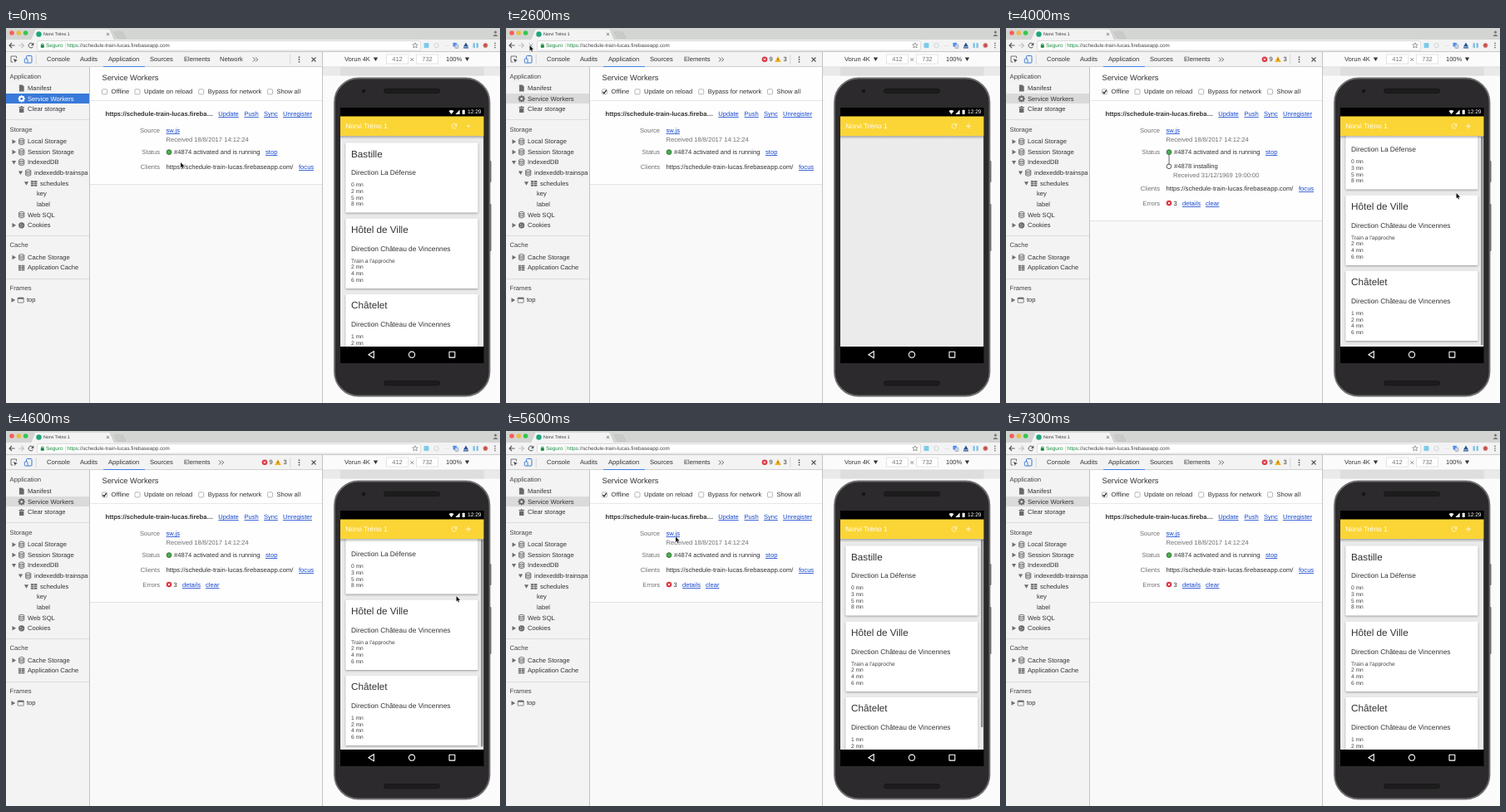
An HTML page with a canvas for the animation above (7.4 s loop, 594x452 px).

```html
<!DOCTYPE html>
<html lang="en">
<head>
<meta charset="utf-8">
<title>Service worker offline demo</title>
<style>
html, body { margin: 0; width: 100%; height: 100%; overflow: hidden; background: #fff; }
canvas { display: block; }
</style>
</head>
<body>
<canvas id="stage" width="594" height="452"></canvas>
<script>
const LOOP = 7400, STEP = 100;
const HOST = 'https://schedule-train-lucas.fireba';
const INK = '#333', GREY = '#707070', ICON = '#6a6a6a', BLUE = '#1547d0', RED = '#d9333f';
const c = document.getElementById('stage').getContext('2d');
c.textRendering = 'geometricPrecision';
c.textBaseline = 'middle';

// Drawing helpers
function rect(x, y, w, h, fill) {
  c.fillStyle = fill;
  c.fillRect(x, y, w, h);
}
function box(x, y, w, h, r, fill, stroke, width = 1) {
  c.beginPath();
  c.roundRect(x, y, w, h, r);
  paint(fill, stroke, width);
}
function dot(x, y, r, fill, stroke, width = 1) {
  c.beginPath();
  c.arc(x, y, r, 0, 7);
  paint(fill, stroke, width);
}
function path(d, x, y, fill, stroke, width = 1) {
  c.save();
  c.translate(x, y);
  const p = new Path2D(d);
  c.lineWidth = width;
  if (stroke) { c.strokeStyle = stroke; c.stroke(p); }
  if (fill) { c.fillStyle = fill; c.fill(p); }
  c.restore();
}
function paint(fill, stroke, width) {
  if (fill) { c.fillStyle = fill; c.fill(); }
  if (stroke) { c.strokeStyle = stroke; c.lineWidth = width; c.stroke(); }
}
function text(s, x, y, size = 7.6, fill = INK, align = 'left', weight = '') {
  c.font = `${weight} ${size}px "Liberation Sans", Arial, sans-serif`;
  c.textAlign = align;
  c.fillStyle = fill;
  c.fillText(s, x, y + .3);
}
function link(s, x, y) {
  text(s, x, y, 7.6, BLUE);
  rect(x, Math.round(y + 3.4), c.measureText(s).width, .8, BLUE);
}
function cross(x, y, r, color, width = 1) {
  path(`M${-r} ${-r}L${r} ${r}M${r} ${-r}L${-r} ${r}`, x, y, null, color, width);
}
function reloadIcon(x, y, r, color) {
  c.beginPath();
  c.arc(x, y, r, .5, 5.6);
  paint(null, color, 1);
  path('M1 -3.4V0H-2.4Z', x + r - .6, y, color);
}
function warning(x, y) {
  path('M0 -3.6L3.8 3.2H-3.8Z', x, y, '#f0b323');
  rect(x - .4, y - 1.4, .8, 2.6, '#6b4d00');
}
function errorDot(x, y) {
  dot(x, y, 3.3, RED);
  cross(x, y, 1.3, '#fff', .9);
}
const down = (x, y, color = INK) => path('M-2.6 -2H2.6L0 2.4Z', x, y, color);
const right = (x, y) => path('M-2 -2.7L2.6 0L-2 2.7Z', x, y, '#6e6e6e');

// Linear interpolation through [time, ...values] keys
function track(keys, t) {
  const i = keys.findIndex(k => k[0] > t);
  if (i < 0) return keys.at(-1).slice(1);
  if (!i) return keys[0].slice(1);
  const a = keys[i - 1], b = keys[i], f = (t - a[0]) / (b[0] - a[0]);
  return a.slice(1).map((v, n) => v + (b[n + 1] - v) * f);
}
const POINTER = [[0, 210, 162], [800, 118, 75], [1100, 118, 75], [1600, 23.5, 21],
  [1900, 28.5, 21], [3100, 28.5, 21], [3900, 541.5, 199], [5200, 541.5, 199],
  [5600, 204, 127.5], [6000, 30, 22], [6500, 25, -12]];
const SCROLL = [[3900, 0], [4000, 28], [4200, 29], [4500, 28], [4600, 26], [4800, 16], [5100, 0]];

function browser(t) {
  rect(0, 0, 594, 14, '#d3d5d3');
  ['#fb5d57', '#e9bd3b', '#35c64b'].forEach((color, i) => dot(7 + i * 8.3, 6, 2.8, color));
  path('M30 14L35 2.5Q35.6 1.5 37 1.5H123Q124.4 1.5 125 2.5L130 14Z', 0, 0, '#f3f3f3', '#b4b4b4', .6);
  path('M130 5H140L144 12H134Z', 0, 0, '#c9cbc9', '#aaa', .6);
  dot(39.5, 7.5, 3.2, '#1da57a');
  text('Norvi Tréno 1', 45, 7.7, 5.3);
  cross(122.5, 7.5, 1.6, '#555', .8);
  dot(588.5, 5, 1.6, '#777');
  path('M-3 3Q0 -1.6 3 3Z', 588.5, 7, '#777');

  rect(0, 14, 594, 15, '#f3f3f3');
  rect(0, 28, 594, 1, '#c8c8c8');
  path('M3.5 0H-3M0 -3L-3 0L0 3', 7, 21, null, '#555', 1.1);
  path('M-3.5 0H3M0 -3L3 0L0 3', 18.5, 21, null, '#c4c4c4', 1.1);
  if (t >= 2000 && t < 3000) cross(30, 21, 2.3, '#aaa');
  else reloadIcon(30, 21, 2.9, '#555');
  box(37.5, 15.5, 461, 11.5, 2, '#fff', '#cfcfcf', .7);
  box(41.8, 20.2, 4, 3.6, .5, '#168a3d');
  c.beginPath();
  c.arc(43.8, 20.2, 1.4, Math.PI, 0);
  paint(null, '#168a3d', .8);
  text('Seguro', 48, 21.3, 6.4, '#168a3d');
  rect(71, 17.5, .6, 8, '#ccc');
  text('https', 73.3, 21.3, 6.3, '#168a3d');
  text(HOST.slice(5) + 'seapp.com', 73.3 + c.measureText('https').width, 21.3, 6.3, '#444');
  path('M0 -3.3L1 -1H3.3L1.5 .6L2.2 3L0 1.6L-2.2 3L-1.5 .6L-3.3 -1H-1Z', 492, 21, null, '#777', .7);
  box(502.5, 18, 6, 6, 1, '#7ccbea');
  dot(517.5, 21, 2.7, null, '#ccd4da');
  text('···', 530, 21, 6, '#aaa', 'center');
  box(537.5, 17.7, 4.5, 4.7, .5, '#4c8df0');
  box(540, 20, 4, 4.5, .5, '#c7d4e6', '#7e8da5', .5);
  path('M0 -3.4L3 1.5H-3ZM-3 2.3H3V3.6H-3Z', 553, 21, '#27549b');
  box(561.5, 18, 6.5, 6, 1, '#86c3e6');
  rect(564, 18, 1.4, 6, '#fff');
  dot(576.5, 21, 2.7, '#c9504b', '#dba09c', .8);
  [-2.6, 0, 2.6].forEach(d => dot(588, 21 + d, .8, '#666'));
}

function toolbar(t) {
  rect(0, 29, 380, 18, '#f3f3f3');
  rect(0, 46, 380, 1, '#cfcfcf');
  path('M3 -1V-3.5H-3.5V3.5H-1', 9.5, 37.5, null, '#666', .9);
  path('M0 0L5 2L2.7 2.8L2 5Z', 9, 37, '#444');
  box(24.5, 33.5, 6.5, 8.5, 1, null, '#3979d8', 1);
  box(22.3, 37, 3.7, 5, .6, '#f3f3f3', '#3979d8', .9);
  rect(35.8, 32, .7, 12, '#ccc');
  rect(117, 46, 50, 1, '#3b82e8');
  [['Console', 49], ['Audits', 89], ['Application', 123], ['Sources', 173], ['Elements', 214]]
    .forEach(([s, x]) => text(s, x, 38));
  let more = 297;
  if (t < 900) text('Network', 257, 38);
  else if (t < 2400) {
    warning(260, 38);
    text('Network', 267, 38);
    more = 307;
  } else {
    more = 256;
    errorDot(311, 37.7);
    text('9', 316.5, 38);
    warning(327, 37.7);
    text('3', 333.5, 38);
  }
  path('M0 -2.5L2.5 0L0 2.5M3.2 -2.5L5.7 0L3.2 2.5', more, 38, null, '#555', .9);
  rect(341.5, 32, .7, 12, '#ccc');
  [-2.8, 0, 2.8].forEach(d => dot(352.5, 38 + d, .9, '#555'));
  cross(370, 38, 2.5, '#555', 1.1);
}

const ICONS = {
  doc(x, y) { path('M-2.8 -4H1L3 -2V4H-2.8Z', x, y, ICON); },
  gear(x, y, color) {
    for (let a = 0; a < 8; a++) dot(x + 3.3 * Math.cos(a * Math.PI / 4), y + 3.3 * Math.sin(a * Math.PI / 4), 1, color);
    dot(x, y, 2.4, null, color, 1.8);
  },
  trash(x, y) { path('M-3.3 -3H-1L-.7 -4H.7L1 -3H3.3V-2H-3.3ZM-2.7 -1.4H2.7V4H-2.7Z', x, y, ICON); },
  db(x, y) {
    c.beginPath();
    c.ellipse(x, y - 2.7, 3.1, 1.2, 0, 0, 7);
    paint(null, ICON, .9);
    path('M-3.1 -2.7V2.7Q0 5 3.1 2.7V-2.7M-3.1 -.8Q0 1.4 3.1 -.8M-3.1 1Q0 3.2 3.1 1', x, y, null, ICON, .9);
  },
  table(x, y) {
    for (let i = 0; i < 6; i++) rect(x - 3.8 + i % 2 * 4, y - 3.2 + (i >> 1) * 2.4, 3.5, 1.8, ICON);
  },
  cookie(x, y) {
    dot(x, y, 3.6, ICON);
    [[-1, -1], [1.2, .3], [-.8, 1.5]].forEach(([a, b]) => dot(x + a, y + b, .6, '#f3f3f3'));
  },
  frame(x, y) {
    box(x - 3.5, y - 3, 7, 6, .5, null, ICON, .8);
    rect(x - 3.5, y - 3, 7, 1.8, ICON);
  }
};

// [label, x, y, icon, arrow]
const TREE = [
  ['Manifest', 26, 72.5, 'doc'], ['Service Workers', 26, 85.3, 'gear'], ['Clear storage', 26, 98, 'trash'],
  ['Local Storage', 26, 137, 'db', right], ['Session Storage', 26, 149.5, 'db', right],
  ['IndexedDB', 26, 162, 'db', down], ['indexeddb-trainspa', 34, 174.6, 'db', down],
  ['schedules', 41, 187.3, 'table', down], ['key', 37, 200], ['label', 37, 212.5],
  ['Web SQL', 26, 225.2, 'db'], ['Cookies', 26, 237.8, 'cookie', right],
  ['Cache Storage', 26, 276.5, 'db', right], ['Application Cache', 26, 289, 'table'],
  ['top', 25, 328, 'frame', right]
];

function sidebar(t) {
  rect(0, 47, 100, 405, '#f3f3f3');
  const focused = t < 900;
  rect(0, 79, 100, 12, focused ? '#3879d9' : '#dadada');
  [['Application', 58.3], ['Storage', 122.5], ['Cache', 261.5], ['Frames', 313.3]]
    .forEach(([s, y]) => text(s, 4.5, y, 7.7, '#444'));
  [110, 250, 302].forEach(y => rect(0, y, 100, 1, '#dcdcdc'));
  c.save();
  c.beginPath();
  c.rect(0, 47, 100, 405);
  c.clip();
  for (const [label, x, y, icon, arrow] of TREE) {
    const color = focused && icon === 'gear' ? '#fff' : null;
    text(label, x, y, 7.6, color || INK);
    if (icon) ICONS[icon](x - 7.3, y, color || ICON);
    if (arrow) arrow(x - 16.5, y, '#6e6e6e');
  }
  c.restore();
  rect(100, 47, 1, 405, '#c2c2c2');
}

function panel(t) {
  const installing = t >= 3000 && t < 4300, errors = t >= 3000;
  const shift = installing ? 26 : 0, bottom = (errors ? 206 : 188) + shift;
  rect(101, 47, 279, 405, '#f9f9f9');
  rect(101, 47, 279, bottom - 47, '#fefefe');
  rect(101, 87, 279, .8, '#e2e2e2');
  rect(101, bottom, 279, 1, '#e2e2e2');
  text('Service Workers', 115.5, 59.7, 9.3);
  [['Offline', 118.5], ['Update on reload', 158], ['Bypass for network', 234.7], ['Show all', 317.5]].forEach(([s, x], i) => {
    box(x - 3, 73.8, 6, 6, 1, '#fff', '#999', .7);
    text(s, x + 8, 77);
    if (!i && t >= 900) path('M-2 0L-.5 1.8L2.2 -2.2', x, 77, null, '#222', 1.2);
  });
  text(HOST + '…', 119.5, 103.8, 7.6, INK, 'left', 'bold');
  [['Update', 255.3], ['Push', 286.5], ['Sync', 310], ['Unregister', 333]].forEach(([s, x]) => link(s, x, 103.8));
  const label = (s, y) => text(s, 185, y, 7.6, GREY, 'right');
  label('Source', 123.7);
  link('sw.js', 192.5, 123.7);
  text('Received 18/8/2017 14:12:24', 192.5, 134.3, 7.6, GREY);
  label('Status', 149.8);
  if (installing) {
    rect(195.6, 152, .9, 13, '#555');
    dot(196, 166.8, 2.8, '#fff', '#444', .9);
    text('#4878 installing', 202, 167);
    text('Received 31/12/1969 19:00:00', 201, 177.7, 7.6, GREY);
  }
  dot(196, 149.6, 2.9, '#4caf50', '#2f6b33', .9);
  text('#4874 activated and is running', 202, 149.8);
  link('stop', 312, 149.8);
  label('Clients', 167.7 + shift);
  text(HOST + 'seapp.com/', 192.5, 167.7 + shift, 7.7);
  link('focus', 352, 167.7 + shift);
  if (errors) {
    label('Errors', 185.3 + shift);
    errorDot(196, 185 + shift);
    text('3', 201.5, 185.3 + shift);
    link('details', 212, 185.3 + shift);
    link('clear', 240, 185.3 + shift);
  }
}

function deviceBar() {
  rect(380, 29, 214, 423, '#fbfbfb');
  rect(380, 29, 1, 423, '#c2c2c2');
  rect(381, 47, 213, 10.5, '#eaeaea');
  rect(402, 47, 172.5, 10.5, '#dedede');
  rect(381, 46.6, 213, .6, '#d2d2d2');
  text('Vorun 4K', 407, 37.7, 7.5);
  down(444.5, 37.5);
  [['412', 457.5], ['732', 493.5]].forEach(([s, x]) => {
    box(x, 32, 26, 11, 0, '#fff', '#ddd', .8);
    text(s, x + 13, 37.8, 7.5, '#777', 'center');
  });
  cross(488.3, 38, 1.9, '#777', .8);
  text('100%', 529, 37.7, 7.5);
  down(554.5, 37.5);
}

function card(y, title, direction, times) {
  c.save();
  c.shadowColor = 'rgba(0,0,0,.35)';
  c.shadowBlur = 2.5;
  c.shadowOffsetY = 1;
  box(408.3, y, 159.2, 84.3, 1, '#fff');
  c.restore();
  text(title, 415, y + 14, 11.7);
  text('Direction ' + direction, 415, y + 36.5, 8.35);
  times.forEach((s, i) => text(s + (isNaN(s) ? '' : ' mn'), 415, y + 51 + i * 7.65, 6.65, '#444'));
}

function phone(t) {
  box(581, 160, 2.5, 26, 1, '#6a6a6a');
  box(581, 212, 2.5, 57, 1, '#6a6a6a');
  box(395, 60.5, 186.5, 383, 29, '#2c2a2c', '#6e6e6e', 1.8);
  dot(430, 76, 2.2, '#171617');
  box(454.5, 73.3, 67, 5.2, 2.5, '#1d1c1d', '#141314', .7);
  box(454.5, 425.5, 67, 5.2, 2.5, '#1d1c1d', '#141314', .7);

  rect(402, 96, 172.5, 308, '#000');
  path('M-3 -1.6Q0 -4 3 -1.6L0 2.3Z', 535.5, 101.7, '#fff');
  path('M2.6 -3V2.5H-2.6Z', 543, 101.5, '#fff');
  box(548.7, 98.7, 3, 5.3, .5, '#fff');
  text('12:29', 555, 101.3, 6.6, '#fff');

  const [scroll] = track(SCROLL, t);
  c.save();
  c.beginPath();
  c.rect(402, 130, 172.5, 254);
  c.clip();
  rect(402, 130, 172.5, 254, '#ebebeb');
  if (t < 2400 || t >= 2800) {
    card(138.2 - scroll, 'Bastille', 'La Défense', [0, t < 2400 ? 2 : 3, 5, 8]);
    card(229.6 - scroll, 'Hôtel de Ville', 'Château de Vincennes', ["Train a l'approche", 2, 4, 6]);
    card(320.8 - scroll, 'Châtelet', 'Château de Vincennes', [1, 2, 4, 6]);
  }
  if (t >= 4000 && t < 6000) {
    c.globalAlpha = Math.min(1, (6000 - t) / 300);
    rect(571.2, 131, 2.2, 226 + scroll * .9, '#858585');
    c.globalAlpha = 1;
  }
  const shade = c.createLinearGradient(0, 130, 0, 134);
  shade.addColorStop(0, 'rgba(0,0,0,.28)');
  shade.addColorStop(1, 'rgba(0,0,0,0)');
  rect(402, 130, 172.5, 4, shade);
  c.restore();

  rect(402, 106.5, 172.5, 23.5, '#fbd536');
  text('Norvi Tréno 1', 408.3, 118, 8.4, '#fff');
  reloadIcon(539, 118.2, 2.9, '#fff4bd');
  const plus = t < 2400 ? 1.7 : 3;
  path(`M${-plus} 0H${plus}M0 ${-plus}V${plus}`, 556, 118.2, null, '#fff6cc', 1);

  path('M3 -4V4L-3.4 0Z', 439.3, 393.7, null, '#fff', 1.1);
  dot(488, 393.7, 3.6, null, '#fff', 1.1);
  box(533, 390.3, 6.8, 6.8, .3, null, '#fff', 1.1);
}

function draw(t) {
  browser(t);
  toolbar(t);
  panel(t);
  sidebar(t);
  deviceBar();
  phone(t);
  path('M0 0V6.5L1.5 5.1L2.5 7.5L3.5 7L2.5 4.8H4.6Z', ...track(POINTER, t), '#111', '#fff', .8);
}

const start = performance.now();
(function tick() {
  const t = (performance.now() - start) % LOOP;
  draw(Math.floor(t / STEP) * STEP);
  requestAnimationFrame(tick);
})();
</script>
</body>
</html>
```
